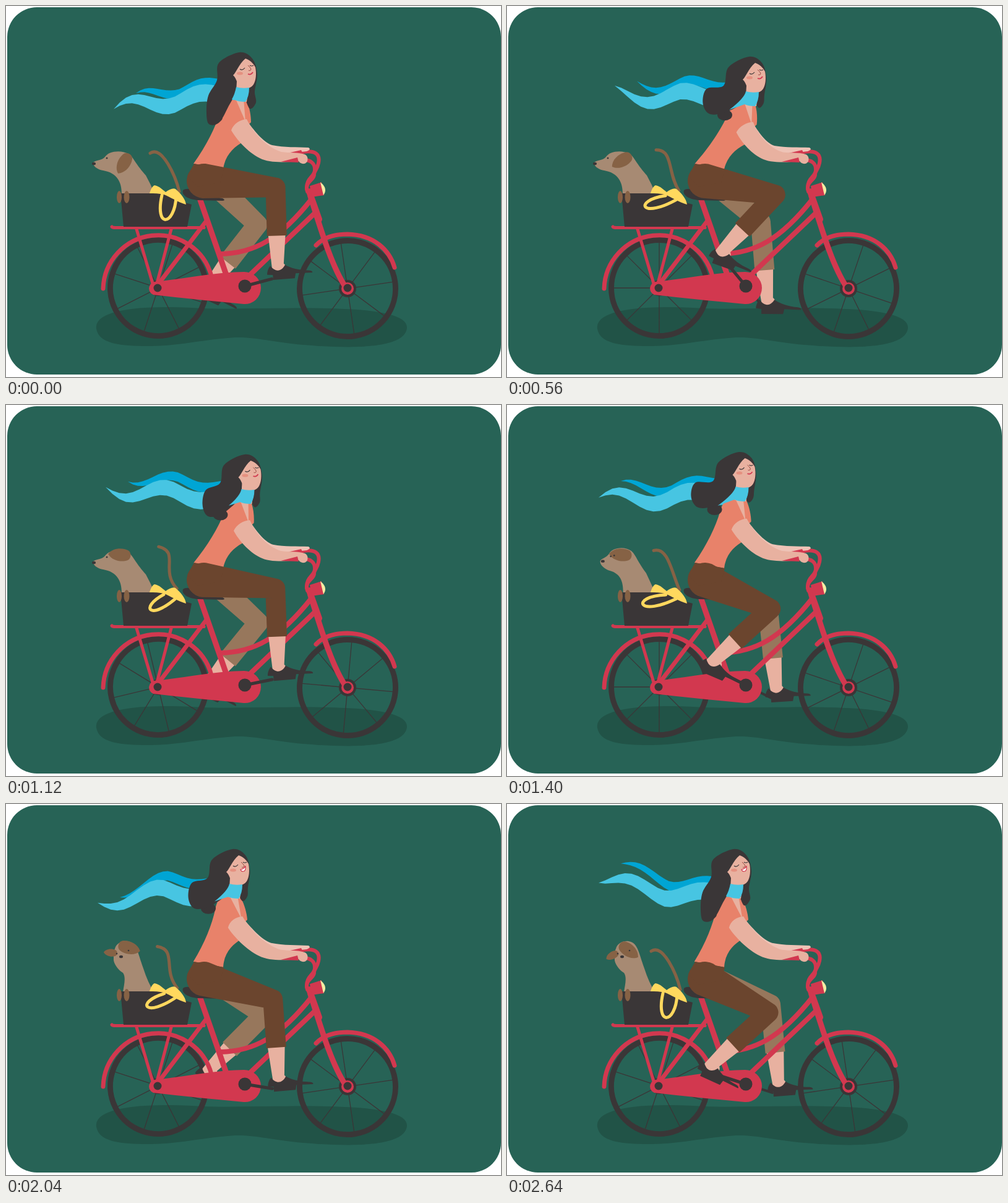
Animation, 800 px wide and 600 px high, one loop 2680 ms. Source, as an HTML page:

```html
<!DOCTYPE html>
<html lang="en">
<head>
<meta charset="utf-8">
<title>Bike ride</title>
<style>
html, body { margin: 0; width: 100%; height: 100%; overflow: hidden; background: #fff; }
svg { display: block; width: 800px; height: 600px; }
.red { fill: #d2384f; } .dark { fill: #3a3637; } .skin { fill: #e8b1a0; }
.pants { fill: #6b452e; } .farpants { fill: #97775c; } .shirt { fill: #e8826a; }
.dog { fill: #a78a73; } .ear { fill: #866245; } .gold { fill: #ffd85e; }
.sky { fill: #47c5e2; } .deep { fill: #00a5d4; }
.line, .bar, .cord { fill: none; stroke-linecap: round; }
.line { stroke: #d2384f; } .bar { stroke: #3a3637; } .cord { stroke-width: 5; }
</style>
</head>
<body>
<svg viewBox="0 0 800 600">
  <rect x="2" y="2" width="798" height="594" rx="48" fill="#276356"/>
  <path fill="#215347" d="M146 522C142 495 200 483 300 488C340 491 380 489 420 489C520 488 648 486 648 520C646 558 540 553 480 548C430 543 400 535 370 536C310 540 280 551 220 550C180 549 150 545 146 522Z"/>

  <path id="deepScarf" class="deep"/>
  <path id="lightScarf" class="sky"/>

  <defs>
    <g id="wheel" class="bar">
      <path stroke-width="1.3" d="M-73 0H73M0-73V73M-52-52L52 52M-52 52L52-52"/>
      <circle r="77.5" stroke-width="9"/>
    </g>
    <path id="flap" d="M0-8C10-12 25-10 32 1C25 12 8 12 0 8C-6 5-6-5 0-8Z"/>
  </defs>
  <use id="rear" href="#wheel"/>
  <use id="front" href="#wheel"/>
  <circle class="dark" cx="246" cy="456" r="13"/>
  <circle class="dark" cx="552" cy="457" r="14"/>

  <g id="farLeg">
    <path class="bar" stroke-width="4"/><path class="skin"/><path class="dark"/><path class="farpants"/>
  </g>

  <g class="line">
    <path stroke-width="7" d="M157 457A89 89 0 0 1 332 437"/>
    <path stroke-width="7" d="M501 387C515 372 535 369 552 369C595 370 620 395 628 423"/>
    <path stroke-width="5" d="M171 357Q172 358.5 177 358.5H320"/>
    <path stroke-width="5" d="M211 361L238 452M267 361L243 452"/>
    <path stroke-width="7" d="M325 346L246 450"/>
    <path stroke-width="9" d="M314 314L355 432"/>
    <path stroke-width="8" d="M347 401C400 400 442 378 494 312M392 437L499 335"/>
    <path stroke-width="10" d="M490 300L506 345"/>
    <path stroke-width="9" d="M492 308C510 365 526 420 549 455"/>
  </g>
  <path class="red" d="M240 446C290 441 340 430 384 430A27 26 0 0 1 412 456A26 26 0 0 1 384 482C340 478 290 473 238 467A11 11 0 0 1 240 446Z"/>
  <circle class="dark" cx="245" cy="456" r="6.5"/>
  <circle class="red" cx="552" cy="457" r="10"/>
  <circle class="dark" cx="552" cy="456" r="6.5"/>

  <path id="tail" class="cord" stroke="#866245"/>
  <path id="dog" class="dog"/>
  <use id="farEar" href="#flap" class="ear"/>
  <use id="nearEar" href="#flap" class="ear"/>
  <g class="dark">
    <ellipse id="nose" rx="3" ry="2.2"/><circle id="eyeA" r="1.3"/><circle id="eyeB" r="1.3"/>
  </g>
  <path class="dark" d="M185 303L258 303Q276 315 300 321L293 357H190Z"/>
  <ellipse class="ear" cx="183" cy="309" rx="4" ry="10"/>
  <ellipse class="ear" cx="195" cy="309" rx="4.5" ry="10"/>
  <path class="gold" d="M232 303C234 296 237 291 240 290C247 291 252 296 258 301C263 297 270 294 274 296C282 303 290 312 291 321C285 320 270 312 258 306C250 303 240 303 232 303Z"/>
  <path id="strap" class="cord" stroke="#ffd85e"/>
  <path class="dark" d="M286 298C292 293 305 297 315 305L350 311Q356 314 350 315L310 314C295 313 283 306 286 298Z"/>

  <g class="line" stroke-width="6">
    <path d="M480 236C500 233 508 240 505 254C503 265 497 268 498 273C498 282 482 284 487 300"/>
    <path d="M477 250C492 247 500 255 499 266C498 277 485 278 486 296"/>
  </g>
  <path class="red" d="M491 291L510 285L514 306L494 309Z"/>
  <path fill="#f4eca3" d="M508 285Q521 295 513 306Z"/>

  <path class="lean" fill="#eec3b6" d="M388 184C400 200 415 220 430 225C450 229 470 228 489 229Q494 232 486 235C470 237 440 240 425 237C405 232 392 210 386 195Z"/>
  <path class="red" d="M455 238L477 233L481 241Z"/>
  <path class="lean shirt" d="M303 255C324 226 339 195 346 172C350 157 357 151 367 152L389 153C394 165 396 178 396 188L388 196L383 220C370 227 354 240 351 264Z"/>
  <path class="lean skin" d="M371 150L384 150L387 187Z"/>
  <path class="lean skin" d="M364 201C368 190 378 184 389 183C400 205 420 228 445 236C460 238 470 236 483 240Q489 243 487 251C484 257 476 256 473 251C450 253 425 254 410 246C390 236 372 215 364 201Z"/>
  <path class="red" d="M444 252L471 245L473 253Z"/>

  <g id="head">
    <ellipse id="curl" class="dark" cx="338" rx="12" ry="9"/>
    <path id="hair" class="dark"/>
    <path class="skin" d="M373 122L393 122L389 155L371 153Z"/>
    <path class="skin" d="M367 112C372 108 376 94 387 85C394 87 400 93 403 99C405 110 404 120 400 127C395 134 385 136 376 131C374 124 371 115 367 112Z"/>
    <ellipse cx="378" cy="109" rx="5" ry="2.5" fill="#e59180"/>
    <path fill="none" stroke="#3a3637" stroke-width="1.2" d="M378 102Q382 105 386 100M394 96Q397 98 400 96"/>
    <path fill="none" stroke="#9a4a42" d="M391 96Q398 102 395 104Q393 105 392 104"/>
    <path id="calm" fill="none" stroke="#d2384f" stroke-width="1.6" d="M391 110Q396 112 399 107"/>
    <path id="smile" fill="#fff" stroke="#d2384f" stroke-width="1.2" d="M390 108Q396 107 398 102Q399 111 394 111Q391 111 390 108Z"/>
    <path id="wrap" class="sky"/>
  </g>

  <g id="nearLeg">
    <path class="bar" stroke-width="5"/><path class="skin"/><path class="dark"/><path class="pants"/>
  </g>
  <path class="pants" d="M304 255L352 264L346 286L310 292L293 275Z"/>
  <circle class="dark" cx="386" cy="453" r="10.5"/>
</svg>
<script>
const STEP = 40, LOOP = 2680;
const GUST = 22;                       // frames from one gust of wind to the next
const TAU = Math.PI * 2;

const $ = id => document.getElementById(id);
const set = (id, name, value) => $(id).setAttribute(name, value);
const clamp = (v, a = 0, b = 1) => Math.min(b, Math.max(a, v));
const lerp = (a, b, k) => a + (b - a) * k;
const mix = (a, b, k) => a.map((v, i) => lerp(v, b[i], k));
const swing = (f, period) => Math.cos(TAU * f / period);
const ease = (f, from, to) => {
  const k = clamp((f - from) / (to - from));
  return k * k * (3 - 2 * k);
};

// Mixes two paths that are built alike.
function blend(a, b, k) {
  const ends = b.match(/[\d.]+/g);
  let i = 0;
  return a.replace(/[\d.]+/g, v => lerp(+v, +ends[i++], k));
}

// Closed smooth curve through points.
function smooth(p) {
  const n = p.length, at = i => p[(i + n) % n];
  const pull = (i, side) => at(i).map((v, j) => v + side * (at(i + 1)[j] - at(i - 1)[j]) / 6);
  return `M${p[0]}` + p.map((_, i) => `C${pull(i, 1)} ${pull(i + 1, -1)} ${at(i + 1)}`).join('') + 'Z';
}

// Tapering band; waves run from the neck to the tip, which also swings slowly.
function ribbon(f, x, y, length, half, crest) {
  const top = [], low = [];
  for (let s = 0; s <= 1.001; s += .05) {
    const px = x - length * s;
    const wave = 12 * Math.min(1, s * 2) * Math.cos(TAU * ((crest - px) / 130 - f * 2 / GUST));
    const py = y + wave + 26 * s ** 3 * swing(f, GUST * 2);
    const w = half * Math.max(0, 1 - s ** 4);
    top.push([px, py - w]);
    low.unshift([px, py + w]);
  }
  return `M${top.join('L')}L${low.join('L')}Z`;
}

// The upper body follows the head; hips and hands stay put.
const leaning = [...document.querySelectorAll('.lean')].map(el => [el, el.getAttribute('d')]);
function lean(d, dx, dy) {
  return d.replace(/([\d.]+) ([\d.]+)/g, (_, x, y) => {
    const w = clamp((258 - y) / 120) * clamp((480 - x) / 90);
    return `${+x + dx * w} ${+y + dy * w}`;
  });
}

const points = s => s.split(' ').map(p => p.split(',').map(Number));
const hairDown = points('377,75 398,85 406,110 402,138 404,156 394,166 384,145 374,140 362,158 345,188 328,191 324,172 327,145 341,120 344,92');
const hairBlown = points('377,75 398,85 405,110 402,136 400,149 393,156 384,146 374,140 359,154 332,162 309,162 298,145 305,123 335,122 344,92');

function rider(f) {
  const forward = ease(f, 0, 8), back = ease(f, 21, 44);
  const dx = 14 * forward - 25 * back, dy = 7 * forward - 9 * back;
  const blow = .5 - .5 * swing(f, GUST);
  for (const [el, d] of leaning) el.setAttribute('d', lean(d, dx, dy));
  set('head', 'transform', `translate(${dx} ${dy})`);
  set('hair', 'd', smooth(hairDown.map((p, i) => mix(p, hairBlown[i], blow))));
  set('curl', 'cy', 180 - 13 * blow);
  set('wrap', 'd', `M372 131Q382 134 393 132Q393 146 387 155Q376 155 370 152L${mix([365, 151], [341, 163], blow)}Q370 142 372 131Z`);
  set('calm', 'visibility', back > .9 ? 'hidden' : 'visible');
  set('smile', 'visibility', back > .9 ? 'visible' : 'hidden');

  const reach = 26 * ease(f, 21, 35);
  set('lightScarf', 'd', ribbon(f, 372 + dx, 146 + dy / 2, 198 + dx + reach, 14, 262));
  set('deepScarf', 'd', ribbon(f, 350 + dx, 127 + dy / 2, 140 + dx + reach, 8, 275));
  set('strap', 'd', blend('M252 306C240 360 272 356 275 309', 'M257 307C195 305 205 345 279 311', blow));
}

function dog(f) {
  const turn = ease(f, 30, 44), flip = ease(f, 35, 44), sway = swing(f, GUST);
  set('dog', 'd', blend(
    'M187 304C187 285 180 270 157 266C150 265 140 260 141 253C145 249 155 250 160 244C165 235 185 232 198 239C206 244 208 254 226 274Q234 288 240 304Z',
    'M189 304C191 292 194 280 189 273C182 269 173 258 174 250C174 245 173 240 176 234C179 221 200 217 208 229C214 238 216 250 222 266Q229 288 239 304Z',
    turn));
  const ear = lerp(118 + 64 * ease(f, 8, 21), 380 + 14 * sway, flip);
  set('nearEar', 'transform', `translate(${mix([197, 243], [186, 229], flip)}) rotate(${ear})`);
  set('farEar', 'transform', `translate(177 241) rotate(${172 - 24 * sway}) scale(${.6 * flip})`);
  const place = (id, a, b) => set(id, 'transform', `translate(${mix(a, b, turn)})`);
  place('nose', [142, 255], [186, 247]);
  place('eyeA', [163, 246], [179, 242]);
  place('eyeB', [163, 246], [198, 237]);

  const wag = .5 - .5 * swing(f, GUST / 2);
  set('tail', 'd', blend('M280 300C274 275 252 225 233 238', 'M276 297C248 267 282 238 247 229', wag));
}

// Tapered bar between two points; round ends are optional.
function limb(a, b, ra, rb, round) {
  const t = Math.atan2(b[1] - a[1], b[0] - a[0]);
  const off = (p, r) => [p[0] + Math.sin(t) * r, p[1] - Math.cos(t) * r];
  const cap = (r, p) => round ? `A${r} ${r} 0 0 1 ${p}` : `L${p}`;
  return `M${off(a, ra)}L${off(b, rb)}${cap(rb, off(b, -rb))}L${off(a, -ra)}${cap(ra, off(a, ra))}Z`;
}

const SHOE = 'M-12 0C-16 4-18 10-18 14L-9 15V23H26L28 15L55 16Q56 13 50 12C35 11 20 6 12 0C6 10-4 12-12 0Z';

function leg(id, hip, thigh, hipR, deg) {
  const shin = 126, t = deg * TAU / 360, c = Math.cos(t), s = Math.sin(t);
  const pedal = [386 + 45 * c, 453 + 45 * s];
  const ankle = [pedal[0] - 2 + 12 * c, pedal[1] - 17 + 8 * s - 3 * c];
  const dx = ankle[0] - hip[0], dy = ankle[1] - hip[1], far = Math.hypot(dx, dy);
  const bend = Math.acos(clamp((thigh ** 2 + far ** 2 - shin ** 2) / (2 * thigh * far), -1, 1));
  const turn = Math.atan2(dy, dx) - bend;
  const knee = [hip[0] + thigh * Math.cos(turn), hip[1] + thigh * Math.sin(turn)];
  const [crank, skin, shoe, cloth] = $(id).children;
  crank.setAttribute('d', `M386 453L${pedal}`);
  skin.setAttribute('d', limb(mix(knee, ankle, .6), mix(knee, ankle, 1.06), 14, 9) +
    limb(ankle, [ankle[0] + 5, ankle[1] + 5], 9, 9, true));
  shoe.setAttribute('d', SHOE);
  shoe.setAttribute('transform', `translate(${ankle}) rotate(${10 - 15 * c})`);
  cloth.setAttribute('d', limb(hip, knee, hipR, 16, true) + limb(knee, mix(knee, ankle, .62), 16, 16));
}

// Crank angle in degrees at a few moments; about one turn in ten frames.
const turns = [[0, -15], [8, 368], [21, 850], [35, 1287], [44, 1609], [57, 1981], [66, 2358]];
function crankAt(f) {
  const i = Math.max(1, turns.findIndex(([at]) => at >= f));
  const [a, from] = turns[i - 1], [b, to] = turns[i];
  return lerp(from, to, (f - a) / (b - a));
}

function draw(now) {
  const f = Math.floor(now % LOOP / STEP);
  rider(f);
  dog(f);
  const spin = 18 + 13.5 * (f % 3), deg = crankAt(f);
  set('rear', 'transform', `translate(246 456) rotate(${spin})`);
  set('front', 'transform', `translate(552 457) rotate(${spin + 18.7})`);
  leg('farLeg', [332, 282], 103, 19, deg + 180);
  leg('nearLeg', [320, 283], 116, 28, deg);
}

function tick() {
  draw(performance.now());
  requestAnimationFrame(tick);
}
tick();
</script>
</body>
</html>
```
